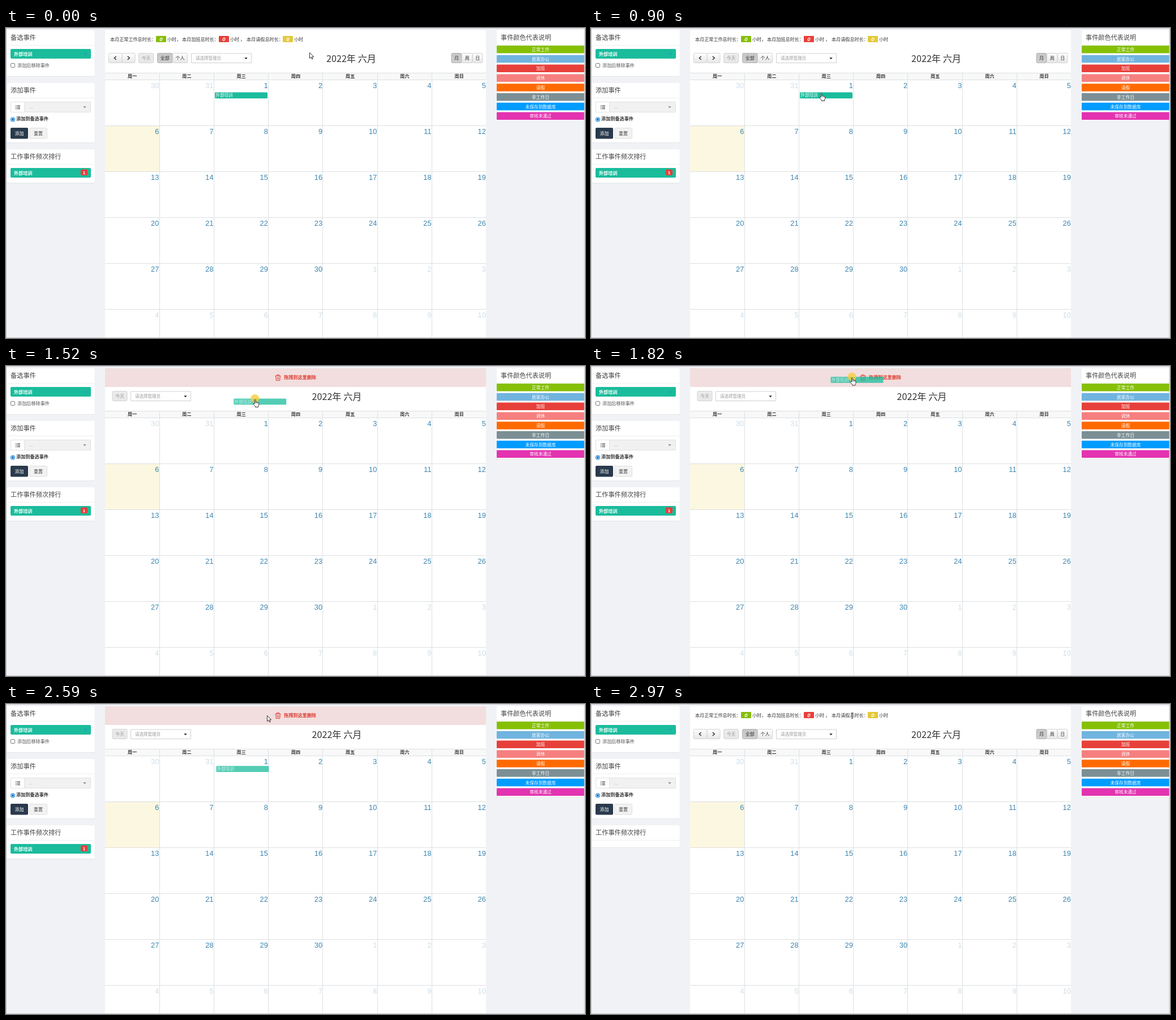
Animation of 1023x547 px, one loop 3.9 s. Source, as an HTML page with a canvas:

```html
<!DOCTYPE html>
<html lang="zh-CN">
<head>
<meta charset="utf-8">
<title>工作日历</title>
<style>
html, body { margin: 0; width: 100%; height: 100%; overflow: hidden; background: #f0f2f5; }
canvas { display: block; width: 1023px; height: 547px; }
</style>
</head>
<body>
<canvas id="stage" width="1023" height="547"></canvas>
<script>
const ctx = document.getElementById('stage').getContext('2d');
const LOOP = 3900;
const CJK = '"Noto Sans CJK SC", "Noto Sans CJK JP", "Noto Sans", sans-serif';
const LATIN = '"Liberation Sans", Arial, sans-serif';
const TEAL = '#1abc9c';
const HOME = { x: 369, y: 113.5 };
const GRAB = { x: 406.5, y: 114.5 };
const COL = 96.25, ROW = 81, LEFT = 175, TOP = 91;

// The picture only changes at these moments
const TICKS = [0, 290, 370, 440, 520, 590, 670, 740, 900, 1210, 1290, 1360, 1440,
  1520, 1590, 1670, 1820, 2210, 2290, 2360, 2440, 2520, 2590, 2670, 2900, 2970];

// Pointer path: time, x, y
const PATH = [[0, 536, 43], [230, 536, 43], [290, 525, 48], [520, 441, 88], [740, 409, 112],
  [900, 406.5, 114.5], [1210, 406.5, 114.5], [1290, 413, 110], [1440, 429, 78],
  [1670, 460, 22], [1820, 461, 20], [2210, 461, 20], [LOOP, 461, 20]];

function pointerAt(t) {
  const i = PATH.findIndex((k, n) => n && t <= k[0]);
  const [t0, x0, y0] = PATH[i - 1], [t1, x1, y1] = PATH[i];
  const p = (t - t0) / (t1 - t0);
  return { x: x0 + (x1 - x0) * p, y: y0 + (y1 - y0) * p };
}

function rect(x, y, w, h, fill) {
  ctx.fillStyle = fill;
  ctx.fillRect(x, y, w, h);
}

function box(x, y, w, h, r, fill, stroke) {
  ctx.beginPath();
  ctx.roundRect(x, y, w, h, r);
  if (fill) { ctx.fillStyle = fill; ctx.fill(); }
  if (stroke) { ctx.lineWidth = 1; ctx.strokeStyle = stroke; ctx.stroke(); }
}

// Text centred vertically on y
function text(s, x, y, size, color, { align = 'left', style = '', family = CJK } = {}) {
  ctx.font = `${style} ${size}px ${family}`;
  ctx.textAlign = align;
  ctx.fillStyle = color;
  ctx.fillText(s, x, y + size * (family === CJK ? 0.38 : 0.36));
}

function line(points, color, width = 1) {
  ctx.beginPath();
  points.forEach(([x, y]) => ctx.lineTo(x, y));
  ctx.strokeStyle = color;
  ctx.lineWidth = width;
  ctx.stroke();
}

function disc(x, y, r, fill) {
  ctx.beginPath();
  ctx.arc(x, y, r, 0, Math.PI * 2);
  ctx.fillStyle = fill;
  ctx.fill();
}

function caret(x, y, color) {
  ctx.beginPath();
  ctx.moveTo(x - 2.7, y - 1.3);
  ctx.lineTo(x + 2.7, y - 1.3);
  ctx.lineTo(x, y + 1.7);
  ctx.fillStyle = color;
  ctx.fill();
}

function panel(y, bottom, title) {
  box(1.5, y, 155, bottom - y, 2, '#fff');
  rect(2, bottom, 154, 1, '#e3e5e8');
  text(title, 8, y + 13, 11.2, '#454545');
  rect(2, y + 26, 154, 1, '#eeeff1');
}

function tealBar(y) {
  box(8, y, 142, 17, 2, TEAL);
  text('外部培训', 14, y + 8.5, 8.1, '#fff', { style: 'bold' });
}

function drawSidebar(listed) {
  panel(4, 85, '备选事件');
  tealBar(37);
  line([[138.5, 43.5], [142.5, 47.5]], '#3585bd');
  line([[142.5, 43.5], [138.5, 47.5]], '#3585bd');
  box(8.5, 62.5, 7, 7, 1, '#fff', '#767676');
  text('添加后移除事件', 20, 66, 8.15, '#555');

  panel(97, 202, '添加事件');
  box(8.5, 130.5, 141, 18, 0, '#f1f1f1', '#e0e2e4');
  rect(9, 131, 23, 17, '#fff');
  rect(32, 131, 1, 17, '#e0e2e4');
  for (let i = 0; i < 3; i++) {
    rect(17, 136.5 + i * 2.7, 1.3, 1.3, '#444');
    rect(19.5, 136.5 + i * 2.7, 5.5, 1.2, '#444');
  }
  text('...', 41, 139, 8, '#aaa');
  caret(139, 139.5, '#888');
  disc(12, 161.5, 4, '#0b78d0');
  disc(12, 161.5, 3.1, '#fff');
  disc(12, 161.5, 2.2, '#0b78d0');
  text('添加到备选事件', 18, 160, 8.15, '#333', { style: 'bold' });
  box(8, 176, 31, 19.5, 2, '#293a4c');
  text('添加', 23.5, 185.5, 8, '#fff', { align: 'center' });
  box(41.5, 176.5, 31, 18.5, 2, '#f2f2f2', '#dedede');
  text('重置', 57, 185.5, 8, '#444', { align: 'center' });

  panel(214, listed ? 273 : 253, '工作事件频次排行');
  if (listed) {
    tealBar(247);
    box(132, 249.5, 12, 10.5, 2, '#e43f3b');
    text('1', 138, 254.8, 8, '#fff', { align: 'center', style: 'bold', family: LATIN });
  }
}

function drawLegend() {
  rect(867, 4, 155, 159, '#fff');
  text('事件颜色代表说明', 874, 17, 11.15, '#454545');
  rect(867, 29, 155, 1, '#eeeff1');
  const items = [['正常工作', '#86c005'], ['居家办公', '#70b4df'], ['加班', '#e7403a'],
    ['调休', '#f67f7f'], ['请假', '#ff6a00'], ['非工作日', '#7b8f95'],
    ['未保存到数据库', '#009cff'], ['审核未通过', '#e333b0']];
  items.forEach(([label, color], i) => {
    const y = 31 + i * 16.8;
    box(867, y, 155, 13.5, 1, color);
    text(label, 944.5, y + 6.8, 7.7, '#fff', { align: 'center' });
  });
}

function button(x, w, label, { on, off } = {}) {
  const g = ctx.createLinearGradient(0, 44, 0, 62);
  g.addColorStop(0, on ? '#c6c6c6' : off ? '#ececec' : '#fff');
  g.addColorStop(1, on ? '#cfcfcf' : off ? '#e8e8e8' : '#e6e6e6');
  box(x + 0.5, 44.5, w - 1, 17, 2, g, on ? '#b4b4b4' : '#d2d2d2');
  text(label, x + w / 2, 52.5, 8.1, off ? '#9b9b9b' : '#333', { align: 'center' });
}

function chevron(x, dir) {
  line([[x - 1.7 * dir, 50], [x + 1.7 * dir, 53], [x - 1.7 * dir, 56]], '#333', 1.5);
}

function drawStats() {
  const stats = [['正常工作', 184, 265, '#86bd0b'], ['加班', 311, 376, '#e7403a'],
    ['请假', 425, 489, '#e3c93b']];
  stats.forEach(([kind, x, bx, color], i) => {
    text(`本月${kind}总时长：`, x, 19.5, 8.1, '#333');
    box(bx, 14, 18, 11, 1, color);
    text('0', bx + 9, 19.5, 9.5, '#fff', { align: 'center', style: 'italic bold', family: LATIN });
    text('小时' + ['，', ' ，', ''][i], bx + 20, 19.5, 8.1, '#333');
  });
}

function drawTrash() {
  rect(175, 4, 673, 33, '#f2dede');
  const red = '#df3f38';
  line([[475.5, 17.5], [485.5, 17.5]], red);
  line([[478.5, 17.5], [478.5, 15.5], [482.5, 15.5], [482.5, 17.5]], red);
  line([[476.7, 17.5], [477.2, 25.5], [483.8, 25.5], [484.3, 17.5]], red);
  for (const x of [479, 480.5, 482]) line([[x, 19.5], [x, 24]], red, 0.7);
  text('拖拽到这里删除', 491, 20, 8.15, '#dc3b30', { style: 'bold' });
}

function drawToolbar(dragging) {
  const shift = dragging ? -107 : 0;
  if (!dragging) {
    button(181, 24.5, '');
    button(204.5, 24, '');
    chevron(193, -1);
    chevron(216.5, 1);
    button(267, 27.5, '全部', { on: true });
    button(294, 27, '个人');
    button(786.5, 19, '月', { on: true });
    button(805, 19.5, '周');
    button(824, 18.5, '日');
  }
  button(dragging ? 187.5 : 234, 27, '今天', { off: true });
  box(327.5 + shift, 45, 106, 16.5, 0, '#fff', '#cfcfcf');
  text('请选择管理员', 335 + shift, 53.5, 7.5, '#999');
  caret(424 + shift, 53.5, '#222');
  text('2022年 六月', dragging ? 584.5 : 610, 53.5, 16.2, '#333', { align: 'center' });
}

function drawGrid(target) {
  rect(LEFT, 79, 673, 12, '#f8f8f9');
  if (target) rect(367, 92, 96, 80, '#e9f6fc');
  rect(LEFT, 173, 96, 80, '#fcf7e1');
  for (let y = TOP; y < 546; y += ROW) rect(LEFT, y, 673, 1, '#dcdfe1');
  rect(LEFT, 79, 673, 1, '#dcdfe1');
  for (let c = 0; c < 7; c++) {
    const right = LEFT + (c + 1) * COL;
    if (c < 6) rect(Math.floor(right - 0.25), 79, 1, 467, '#dcdfe1');
    text('周' + '一二三四五六日'[c], right - COL / 2, 85, 8.1, '#333', { align: 'center', style: 'bold' });
    for (let r = 0; r < 6; r++) {
      const n = r * 7 + c - 1;
      const day = n < 1 ? n + 31 : n > 30 ? n - 30 : n;
      text(day, right - 1, TOP + r * ROW + 10.7, 12.8, n < 1 || n > 30 ? '#cddde7' : '#3a85b0',
        { align: 'right', family: LATIN });
    }
  }
}

function drawEvent(dx, dy, alpha) {
  ctx.globalAlpha = alpha;
  box(HOME.x + dx, HOME.y + dy, 93, 10.8, 1.5, TEAL);
  text('外部培训', HOME.x + dx + 1.3, HOME.y + dy + 5.1, 7.6, '#fff');
  ctx.globalAlpha = 1;
}

function cursor(shape, x, y) {
  ctx.save();
  ctx.translate(x, y);
  if (shape === 'beam') {
    line([[-1.5, -5], [0.5, -4], [2.5, -5]], '#555');
    line([[0.5, -4], [0.5, 5]], '#555');
    line([[-1.5, 6], [0.5, 5], [2.5, 6]], '#555');
  } else {
    const outline = shape === 'arrow'
      ? 'M.5 .5V10.6L2.9 8.4L4.6 12L6.2 11.3L4.6 7.8H7.7Z'
      : 'M-.6 8V1.2Q.3-.7 1.2 1.2V5Q2.4 4.2 3.2 5.4Q4.4 4.7 5 6Q6.7 5.5 7 7.2V10.2Q6.6 11.6 6 12.5V14H.6V12.6L-3 8.6Q-2.6 6.8-.6 8Z';
    const path = new Path2D(outline);
    ctx.fillStyle = '#fff';
    ctx.fill(path);
    ctx.strokeStyle = '#333';
    ctx.lineWidth = 1;
    ctx.stroke(path);
    if (shape === 'hand') {
      line([[1.2, 5], [1.2, 8]], '#333', 0.6);
      line([[3.2, 5.5], [3.2, 8]], '#333', 0.6);
      line([[5.1, 6], [5.1, 8]], '#333', 0.6);
    }
  }
  ctx.restore();
}

function drawDraggedEvent(t, p) {
  let dx = p.x - GRAB.x, dy = p.y - GRAB.y;
  if (t >= 2210) {
    // Eased return to the calendar cell
    const back = 0.5 + Math.cos(Math.PI * Math.min(1, (t - 2158) / 500)) / 2;
    dx *= back;
    dy *= back;
  }
  drawEvent(dx, dy, 0.75);
}

function draw(time) {
  const t = TICKS.filter(k => k <= time).pop();
  const p = pointerAt(t);
  const dragging = t >= 1290 && t < 2670;
  const pressed = t >= 1210 && t < 2210;

  rect(0, 0, 1023, 547, '#f0f2f5');
  drawSidebar(t < 2900);
  rect(LEFT, 4, 673, 542, '#fff');
  drawLegend();
  if (dragging) drawTrash(); else drawStats();
  drawToolbar(dragging);
  drawGrid(dragging && pressed && p.y > 92);
  if (dragging) drawDraggedEvent(t, p);
  else if (t < 2900) drawEvent(0, 0, 1);

  ctx.lineWidth = 1;
  ctx.strokeStyle = '#c3c5c7';
  ctx.strokeRect(0.5, 0.5, 1021.5, 546);
  if (pressed) disc(p.x, p.y - 1, 7.5, 'rgba(247, 205, 60, .8)');
  const shape = t >= 2670 ? 'beam' : t >= 740 && t < 2290 ? 'hand' : 'arrow';
  cursor(shape, p.x, p.y);
}

const start = performance.now();
function loop() {
  draw((performance.now() - start) % LOOP);
  requestAnimationFrame(loop);
}
loop();
</script>
</body>
</html>
```
